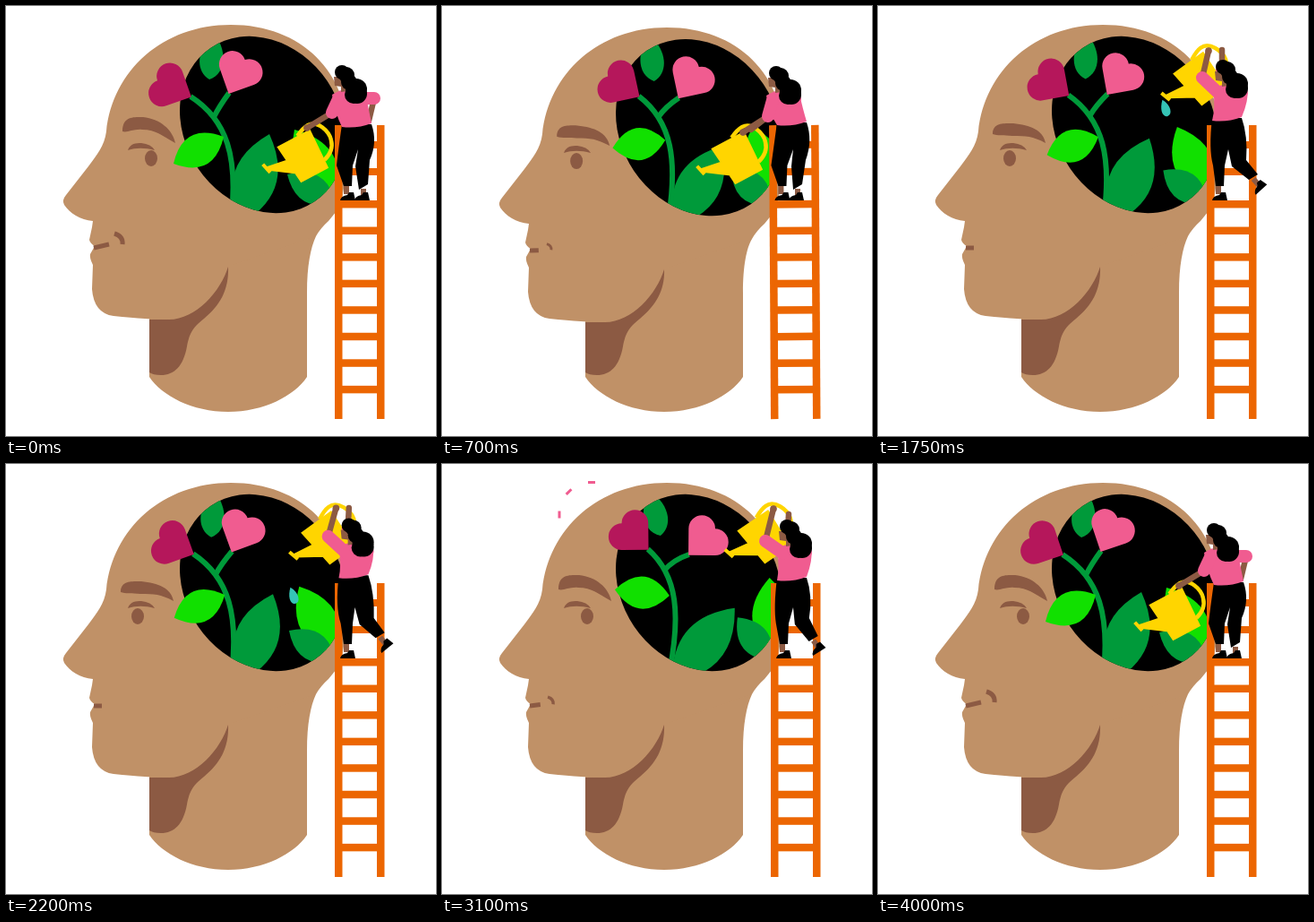
These frames come from a looping animation (480x480 px, 4.05 s). An HTML page with a canvas:

```html
<!DOCTYPE html>
<html lang="en">
<head>
<meta charset="utf-8">
<title>Growing mind</title>
<style>
html, body { margin: 0; height: 100%; overflow: hidden; background: #fff }
canvas { display: block; width: 480px; height: 480px }
</style>
</head>
<body>
<canvas width="480" height="480"></canvas>
<script>
const ctx = document.querySelector('canvas').getContext('2d');
const LOOP = 4050, STEP = 50;
const SKIN = '#c09167', BROWN = '#8c5a43', PINK = '#f05c90', PURPLE = '#b5175b', BLACK = '#000',
  GREEN = '#009a3a', LIME = '#11e000', YELLOW = '#ffd500', ORANGE = '#ec6602', TEAL = '#35c4b5';

// Smooth curve through keys that never overshoots them.
function track(t, times, values) {
  const last = times.length - 1;
  if (t >= times[last]) return values[last];
  const slope = i => (values[i + 1] - values[i]) / (times[i + 1] - times[i]);
  const tangent = i => {
    if (i === 0 || i === last) return 0;
    const a = slope(i - 1), b = slope(i);
    return a * b > 0 ? 2 * a * b / (a + b) : 0;
  };
  let i = 0;
  while (t >= times[i + 1]) i++;
  const span = times[i + 1] - times[i], u = (t - times[i]) / span, v = 1 - u;
  return v * v * (1 + 2 * u) * values[i] + u * u * (3 - 2 * u) * values[i + 1]
    + span * u * v * (v * tangent(i) - u * tangent(i + 1));
}

const POSE_TIMES = [0, 700, 1100, 1750, 2550, 3100, 4000];
const POSES = {
  canX: [333, 331, 351, 361, 361, 361],
  canY: [168, 170, 113, 82, 84, 82],
  canA: [-28, -28, -22, -36, -36, -34],
  headX: [374, 372, 382, 384, 380, 384],
  headY: [79, 80, 78, 73, 74, 75],
  hipX: [392, 391, 396, 390, 388, 391],
  hipY: [137, 135, 134, 130, 129, 132],
  footX: [398, 396, 398, 425, 421, 419],
  footY: [212, 212, 212, 201, 202, 205],
  elbowX: [364, 364, 362, 362, 358, 361],
  elbowY: [119, 123, 105, 80, 82, 86],
  handX: [336, 336, 366, 369, 368, 370],
  handY: [136, 141, 84, 50, 49, 50],
  backElbowX: [411, 368, 370, 384, 380, 386],
  backElbowY: [103, 120, 100, 72, 72, 75],
  backHandX: [405, 345, 377, 384, 382, 387],
  backHandY: [128, 138, 86, 49, 49, 56]
};

function poseAt(t) {
  const p = {};
  for (const key in POSES) p[key] = track(t, POSE_TIMES, [...POSES[key], POSES[key][0]]);
  return p;
}

function swayAt(t) {
  return track((t + LOOP) % LOOP, [0, 150, 700, 1150, 1750, 2030, 2550, 3050, 4000],
    [0, 0, .57, 1, .27, 0, .62, 1, 0]);
}

function fill(color, path) {
  ctx.fillStyle = color;
  ctx.fill(new Path2D(path));
}

function stroke(color, width, path, cap = 'butt') {
  ctx.strokeStyle = color;
  ctx.lineWidth = width;
  ctx.lineCap = cap;
  ctx.lineJoin = 'round';
  ctx.stroke(new Path2D(path));
}

function oval(color, x, y, rx, ry = rx, deg = 0) {
  ctx.beginPath();
  ctx.ellipse(x, y, rx, ry, deg * Math.PI / 180, 0, 7);
  ctx.fillStyle = color;
  ctx.fill();
}

function place(x, y, deg, draw) {
  ctx.save();
  ctx.translate(x, y);
  ctx.rotate(deg * Math.PI / 180);
  draw();
  ctx.restore();
}

function leaf(color, x1, y1, x2, y2, width) {
  const len = Math.hypot(x2 - x1, y2 - y1);
  const nx = (y1 - y2) / len * width, ny = (x2 - x1) / len * width;
  const mx = (x1 + x2) / 2, my = (y1 + y2) / 2;
  fill(color, `M${x1} ${y1}Q${mx + nx} ${my + ny} ${x2} ${y2}Q${mx - nx} ${my - ny} ${x1} ${y1}Z`);
}

function heart(color, x, y, deg) {
  place(x, y, deg, () =>
    fill(color, 'M0 1L-21-20A14.8 14.8 0 0 1 0-41A14.8 14.8 0 0 1 21-20Z'));
}

function drawHead(dip) {
  fill(SKIN, `M160 335V414C174 435 208 453 248 453S322 435 336 414V320
    C336 290 340 270 346 ${257 + dip}L300 200Z`);
  place(0, dip, 0, () => fill(SKIN, `M112 140C110 156 101 167 92 179L67 211Q62 217 65 222
    C71 231 83 239 97 240L96 247L93 261Q94 265 99 268L94 277Q93 281 97 289L96 316
    Q98 343 120 346Q160 350 180 350C225 348 248 318 248 291L346 257Q351 248 360 240L373 224
    C379 198 381 175 382 150C383 74 330 21 251 21C175 21 119 72 112 140Z`));
  fill(BROWN, `M248 ${291 + dip}C249 318 238 335 221 349C207 360 205 366 202 380
    C198 402 188 412 173 412Q164 412 160 409V${350 + dip}H182
    C212 ${350 + dip} 240 ${318 + dip} 248 ${291 + dip}Z`);
}

function drawFace(t) {
  const brow = track(t, [0, 100, 850, 2200, 2550, 2950], [0, 0, 1, 1, 2, 0]);
  const gaze = track(t, [0, 100, 950, 2450, 2700], [162, 162, 147, 147, 162]);
  const shut = track(t, [0, 2300, 2480, 2600, 2800], [0, 0, 1, 1, 0]);
  const smile = track(t, [0, 100, 850, 2800, 3100, 3500], [1, 1, 0, 0, .35, 1]);
  const mix = (a, b, c) => brow < 1 ? a + (b - a) * brow : b + (c - b) * (brow - 1);

  const x = mix(130, 128, 125), y = mix(140, 143, 153), top = mix(124, 131, 139), end = mix(153, 153, 158);
  fill(BROWN, `M${x} ${y}C${x} ${top - 1} ${x + 12} ${top} ${x + 23} ${top}
    C${x + 42} ${top + 2} ${x + 56} ${end - 15} ${x + 59} ${end}
    C${x + 44} ${end - 8} ${x + 38} ${top + 14} ${x + 22} ${top + 14}
    C${x + 12} ${top + 13} ${x + 5} ${y + 2} ${x} ${y}Z`);

  if (shut < .9) oval(BROWN, gaze, 170 + 3 * shut, 7, 9 * (1 - shut));
  place(0, 13 * shut, 0, () =>
    fill(BROWN, 'M136 161C139 153 145 153 151 153Q162 154 166 161C155 158 145 158 136 161Z'));

  stroke(BROWN, 5, `M98 270L${107 + 8 * smile} ${270 - 4 * smile}`);
  if (smile > .05) place(119 + 7 * smile, 266 - 7 * smile, 0, () => {
    const size = .5 + .5 * smile;
    ctx.scale(size, size);
    stroke(BROWN, 5, 'M-5 -5Q5 -2 4 7');
  });
}

function drawPlant(sway, lag) {
  const at = (a, b, k = sway) => a + (b - a) * k;
  const disc = [286.5, 132.5, 103.5, 87];
  oval(BLACK, ...disc, 56);
  ctx.save();
  ctx.beginPath();
  ctx.ellipse(...disc, 56 * Math.PI / 180, 0, 7);
  ctx.clip();
  place(at(227, 244), at(82, 80), at(6, -14), () =>
    fill(GREEN, 'M0 0C-17 -8 -18 -32 0 -52C18 -32 17 -8 0 0Z'));
  leaf(LIME, 370, 215, at(322, 366), at(138, 127), 43);
  leaf(GREEN, 368, 220, at(314, 330), at(188, 171), 32);
  leaf(GREEN, at(262, 257), 243, at(294, 327), at(143, 161), 48);
  const tip = [at(206, 230), at(101, 95)], bud = [at(249, 276), at(97, 101)];
  stroke(GREEN, 6, `M${at(252, 254)} 232C${at(258, 266)} 170 ${at(248, 264)} ${at(128, 125)} ${tip}`);
  stroke(GREEN, 6, `M${at(232, 248)} ${at(124, 119)}Q${at(238, 258)} ${at(112, 107)} ${bud}`);
  ctx.restore();
  leaf(LIME, at(243, 254), at(146, 147), at(187, 193), at(176, 140), 36);
  heart(PURPLE, ...tip, at(-65, -45, lag));
  heart(PINK, ...bud, at(25, 46, lag));
}

function drawLadder(dip) {
  place(394, 461, -.11 * dip, () => {
    ctx.fillStyle = ORANGE;
    for (const x of [-27, 20]) ctx.fillRect(x, -328, 8.5, 328);
    for (const y of [151, 181]) ctx.fillRect(-22, y - 461, 46, 8);
    for (let i = 0; i < 8; i++) ctx.fillRect(-22, -244 + 29.55 * i, 46, 8.5);
  });
}

function drawCan(p) {
  place(p.canX, p.canY, p.canA, () => {
    fill(YELLOW, 'M-22 -24H20L18 24H-17ZM-44 -10L-20 -6L-17 13L-43 -5Z');
    stroke(YELLOW, 4, 'M-45 -14L-42 -2');
    stroke(YELLOW, 4.5, 'M4 -24Q14 -29 20 -29C32 -29 38 -12 35 -2Q32 10 18 14');
  });
}

function arm(shoulder, elbow, hand) {
  stroke(BROWN, 6.5, `M${elbow}L${hand}`, 'round');
  stroke(PINK, 14, `M${shoulder}L${elbow}`, 'round');
}

function drawShoe(x, y, deg) {
  place(x, y, deg, () => fill(BLACK, 'M-9 5Q-8 0 -1 -1L1 -4H6L8 5Z'));
}

function drawWoman(p, lean) {
  const { headX: hx, headY: hy, hipX: px, hipY: py } = p;
  const lift = Math.max(0, p.footX - 399) / 26;

  // Legs
  const stand = 381 - lean, kneeX = 399 + 5 * lift;
  const ankle = [p.footX + 1 - 7 * lift, p.footY - 8];
  stroke(BROWN, 6, `M${stand - 1} 198V210M${ankle}L${p.footX + 1} ${p.footY}`);
  fill(BLACK, `M${px - 17} ${py - 5}H${px + 16}Q${px + 23} ${py + 15} ${kneeX + 7} 172
    L${ankle[0] + 5} ${ankle[1] - 5}L${ankle[0] - 5} ${ankle[1] + 1}L${kneeX - 9} 179
    L${px + 1} 160L${stand + 6} 178L${stand + 5} 201H${stand - 4}L${stand - 12 + 5 * lift} 178
    Q${px - 21} 160 ${px - 17} ${py - 5}Z`);
  drawShoe(stand + 1, 212, 0);
  drawShoe(p.footX, p.footY, -42 * lift);

  // Body
  arm([hx + 22, hy + 24], [p.backElbowX, p.backElbowY], [p.backHandX, p.backHandY]);
  fill(PINK, `M${hx - 10} ${hy + 20}Q${hx} ${hy + 13} ${hx + 10} ${hy + 14}L${hx + 28} ${hy + 22}
    Q${hx + 30} ${hy + 32} ${px + 16} ${py - 6}Q${px} ${py} ${px - 17} ${py - 2}
    Q${hx - 7} ${hy + 40} ${hx - 10} ${hy + 20}Z`);
  arm([hx - 3, hy + 25], [p.elbowX, p.elbowY], [p.handX, p.handY]);
  oval(BROWN, p.handX, p.handY, 3.8);

  // Head
  fill(BROWN, `M${hx - 8} ${hy}L${hx - 7} ${hy + 10}L${hx} ${hy + 11}L${hx} ${hy + 17}
    L${hx + 7} ${hy + 16}V${hy}Z`);
  for (const [x, y, r] of [[1, -5, 8], [6, -2, 9], [9, 6, 9], [17, 14, 12], [14, 20, 10], [18, 19, 11]])
    oval(BLACK, hx + x, hy + y, r);
}

function drawDrops(t) {
  for (const start of [1650, 1950]) {
    const u = (t - start) / 400;
    if (u < 0 || u >= 1) continue;
    place(321, 108 + 100 * u * u, -15, () => {
      const size = Math.min(1, u * 4);
      ctx.scale(size, size);
      fill(TEAL, 'M-1 -10C7 -2 6 9 0 9S-7 0 -1 -10Z');
    });
  }
}

function drawSparks(t) {
  if (t < 2950 || t > 3250) return;
  const r = 36 + (t - 3100) * .02;
  for (const deg of [180, 225, 270])
    place(167, 56.5, deg, () => stroke(PINK, 3, `M${r} -4V4`));
}

function draw(now) {
  const t = Math.floor(now % LOOP / STEP) * STEP;
  const dip = track(t, [0, 100, 500, 1000, 2200, 2550, 3000], [0, 0, 4.8, 0, 0, 5, 0]);
  const pose = poseAt(t);
  ctx.fillStyle = '#fff';
  ctx.fillRect(0, 0, 480, 480);
  drawSparks(t);
  drawHead(dip);
  place(0, dip, 0, () => {
    drawFace(t);
    drawPlant(swayAt(t), swayAt(t - 150));
  });
  drawLadder(dip);
  drawCan(pose);
  drawDrops(t);
  drawWoman(pose, dip * .5);
}

const began = performance.now();
(function loop() {
  draw(performance.now() - began);
  requestAnimationFrame(loop);
})();
</script>
</body>
</html>
```
